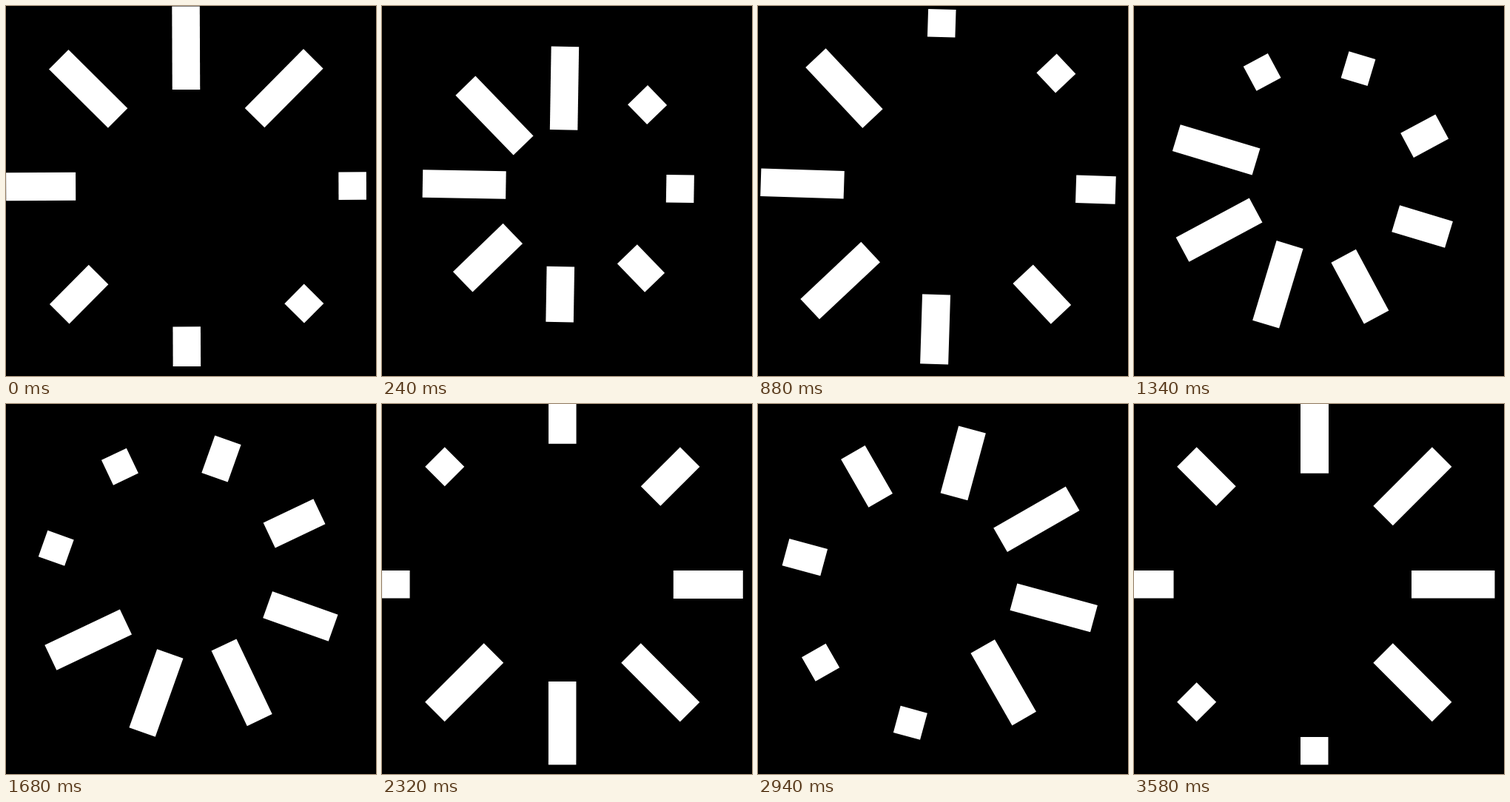
Write an HTML page that moves like this. It is 500 by 500 pixels and loops after 3600 ms.

```html
<!DOCTYPE html>
<html lang="en">
<head>
<meta charset="utf-8">
<title>Loader</title>
<style>
  html, body {
    margin: 0;
    width: 100%;
    height: 100%;
    overflow: hidden;
    background: #000;
  }
  svg {
    display: block;
    width: 100%;
    height: 100%;
    shape-rendering: crispEdges;
  }
  /* --l: bar length, --r: distance of the bar's middle from the centre */
  rect {
    --r: calc(91px - var(--l) / 2);
    x: -7px;
    y: calc(var(--l) / -2);
    width: 14px;
    height: var(--l);
    fill: #fff;
    transform-origin: 0 0;
    /* ease-out cubic */
    animation: turn 3600ms cubic-bezier(.33, 1, .68, 1) infinite;
  }
  /* Three quarter turns; each bar cuts straight across to its next place */
  @keyframes turn {
    0% { transform: translate(0px, calc(var(--r) * -1)) rotate(0deg); }
    33.333333% { transform: translate(calc(var(--r) * -1), 0px) rotate(-90deg); }
    66.666667% { transform: translate(0px, var(--r)) rotate(-180deg); }
    100% { transform: translate(var(--r), 0px) rotate(-270deg); }
  }
</style>
</head>
<body>
<svg viewBox="-91 -91 186.66667 186.66667">
  <g transform="rotate(90)"><rect style="--l: 14px"/></g>
  <g transform="rotate(135)"><rect style="--l: 14px"/></g>
  <g transform="rotate(180)"><rect style="--l: 20px"/></g>
  <g transform="rotate(225)"><rect style="--l: 28px"/></g>
  <g transform="rotate(270)"><rect style="--l: 35px"/></g>
  <g transform="rotate(315)"><rect style="--l: 42px"/></g>
  <g transform="rotate(0)"><rect style="--l: 42px"/></g>
  <g transform="rotate(45)"><rect style="--l: 42px"/></g>
</svg>
</body>
</html>
```
